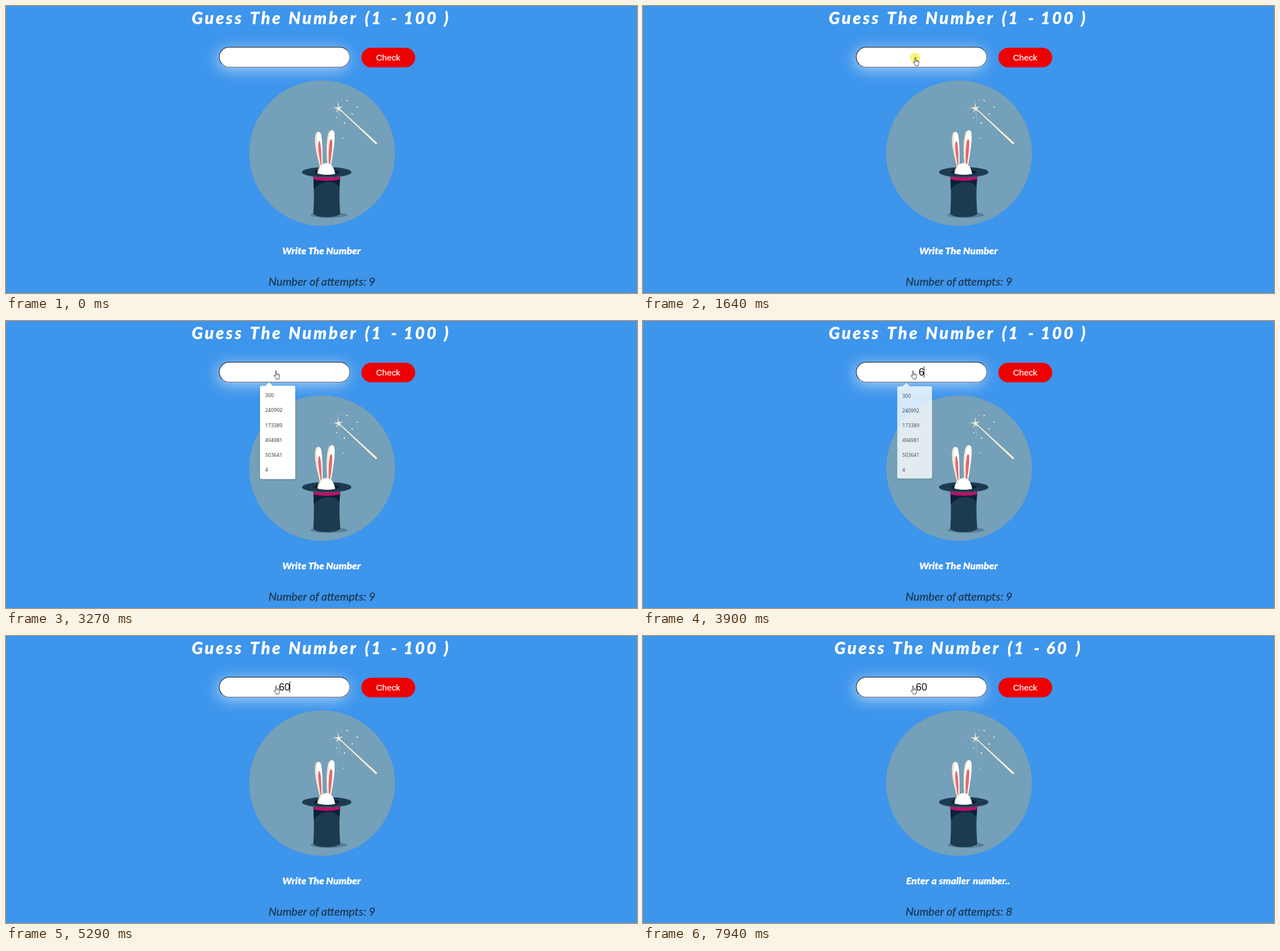
An HTML page that plays this animation: 1108 by 505 pixels, repeating every 8000 ms.

```html
<!DOCTYPE html>
<html lang="en">
<head>
<meta charset="utf-8">
<title>Guess The Number</title>
<style>
  html, body { margin: 0; width: 100%; height: 100%; overflow: hidden; background: #3d95ec; }
  .field {
    position: absolute; left: 374px; top: 72px; width: 230px; height: 36px;
    box-sizing: border-box; border-radius: 18px; background: #fff;
    border: 1px solid; border-color: #10141c #6c6c6c #6c6c6c #10141c;
    box-shadow: -3px 4px 26px rgba(255, 255, 255, .58);
  }
  svg { position: absolute; left: 0; top: 0; width: 1108px; height: 505px; }
  text { white-space: pre; }
  .title { font: italic 900 29.5px Lato, "Open Sans", sans-serif; letter-spacing: 3.2px; fill: #fff; }
  .note { font: italic 900 17.5px Lato, "Open Sans", sans-serif; fill: #fff; stroke: #fff; stroke-width: .2px; }
  .tries { font: italic 400 20px Lato, "Open Sans", sans-serif; fill: #1e3a52; stroke: #1e3a52; stroke-width: .35px; }
  .ui { font: 15px "Liberation Sans", Arial, sans-serif; fill: #fff; text-anchor: middle; }
  .label { stroke: #fff; stroke-width: .2px; }
  .value { font-size: 18px; fill: #111; }
  .list text { font: 8.9px "Open Sans", "Noto Sans", sans-serif; fill: #333; }
  .panel { filter: drop-shadow(0 1px 1px rgba(0, 0, 0, .25)); }

  .anim { animation: 8s step-end infinite; }
  .before { animation-name: before; }
  .after { animation-name: after; }
  .shift { animation-name: shift; }
  .six { animation-name: six; }
  .sixty { animation-name: sixty; }
  .list { animation-name: list; transform-origin: 477px 196px; }
  .click { animation-name: click; }
  .arrow { animation-name: arrow; }
  .hand { animation-name: hand; }
  .caret { animation-name: caret; }

  @keyframes before { 0% { opacity: 1 } 72.5%, 100% { opacity: 0 } }
  @keyframes after { 0% { opacity: 0 } 72.5%, 100% { opacity: 1 } }
  @keyframes shift { 0% { transform: none } 72.5%, 100% { transform: translate(10px, 0) } }
  @keyframes six { 0% { opacity: 0 } 48.75% { opacity: 1 } 53.5%, 100% { opacity: 0 } }
  @keyframes sixty { 0% { opacity: 0 } 53.5%, 100% { opacity: 1 } }
  @keyframes click { 0% { opacity: 0 } 20.5% { opacity: 1 } 22.125%, 100% { opacity: 0 } }
  @keyframes list {
    0% { opacity: 0; transform: none }
    22.125% { opacity: 1; transform: none }
    48.75% { opacity: .79; transform: scale(.988) }
    50.25%, 100% { opacity: 0; transform: none }
  }
  @keyframes arrow {
    0% { opacity: 0; transform: translate(1041px, 495px) }
    4.75% { opacity: 1; transform: translate(1041px, 495px) }
    6.25% { opacity: 1; transform: translate(994px, 478px) }
    7.75% { opacity: 1; transform: translate(850px, 385px) }
    9.375% { opacity: 1; transform: translate(690px, 268px) }
    10.875% { opacity: 1; transform: translate(566px, 184px) }
    12.375% { opacity: 1; transform: translate(512px, 150px) }
    14.125% { opacity: 1; transform: translate(504px, 139px) }
    15.625% { opacity: 1; transform: translate(491px, 118px) }
    17.125%, 100% { opacity: 0; transform: translate(491px, 118px) }
  }
  @keyframes hand {
    0% { opacity: 0; transform: translate(478px, 97px) }
    17.125% { opacity: 1; transform: translate(478px, 97px) }
    18.625% { opacity: 1; transform: translate(474px, 90px) }
    26.625% { opacity: 1; transform: translate(472px, 88px) }
    28.125%, 100% { opacity: 1; transform: translate(470px, 87px) }
  }
  @keyframes caret {
    0% { opacity: 0; transform: translate(489px, 80px) }
    22.125% { opacity: 1; transform: translate(489px, 80px) }
    28.125% { opacity: 0; transform: translate(489px, 80px) }
    34.5% { opacity: 1; transform: translate(489px, 80px) }
    40.875% { opacity: 0; transform: translate(489px, 80px) }
    48.75% { opacity: 1; transform: translate(493px, 80px) }
    53.5% { opacity: 1; transform: translate(498px, 80px) }
    59.75% { opacity: 0; transform: translate(498px, 80px) }
    66.125% { opacity: 1; transform: translate(498px, 80px) }
    72.5% { opacity: 0; transform: translate(498px, 80px) }
    78.625% { opacity: 1; transform: translate(498px, 80px) }
    84.875% { opacity: 0; transform: translate(498px, 80px) }
    92.625% { opacity: 1; transform: translate(498px, 80px) }
    99.25%, 100% { opacity: 0; transform: translate(498px, 80px) }
  }
</style>
</head>
<body>
<div class="field"></div>
<svg viewBox="0 0 1108 505">
  <g class="title">
    <text class="anim shift" y="32"><tspan x="326">Guess</tspan> <tspan x="428">The</tspan> <tspan x="496">Number</tspan> <tspan x="630">(1</tspan> <tspan x="676">-</tspan></text>
    <text class="anim before" y="32"><tspan x="698">100</tspan> <tspan x="769">)</tspan></text>
    <text class="anim after" y="32"><tspan x="708">60</tspan> <tspan x="760">)</tspan></text>
  </g>

  <rect x="624" y="73.4" width="94.6" height="34.6" rx="17.3" fill="#ee0000"/>
  <text class="ui label" x="671" y="95.6">Check</text>

  <!-- magic hat -->
  <circle cx="555" cy="259" r="128" fill="#75a0b9"/>
  <g fill="#f5efdc">
    <path d="M583.6 180.6 L584.6 179.4 L651.8 240.8 Q651.6 243 649.4 243.2 Z"/>
    <path d="M583.2 169.5 L584.6 178 L591.5 177 L586 180.6 L589.5 187 L584.2 182.4 L579 188 L582 181.2 L575 177.8 L582.6 178.6 Z"/>
    <g opacity=".35">
      <path d="M580.5 154 L584.4 180 L583.2 180 Z"/>
      <path d="M562 181.4 L584 179.2 L584 180.8 Z"/>
      <path d="M586.4 213 L583.4 180 L584.8 180 Z"/>
    </g>
    <g id="sparks"></g>
  </g>
  <ellipse cx="567" cy="367.8" rx="32.5" ry="5" fill="#567f99"/>
  <path d="M539.5 296 Q542 332 539.5 366 Q545 371.5 563 371.5 Q581 371.5 587 366 Q584 332 587 296 Z" fill="#1d3b50"/>
  <path d="M539.6 298 H586.9 L585.8 318 Q577 308 563 310 Q548 312 540.6 323 Z" fill="#0b2039"/>
  <path d="M539.7 298 H586.8 L586.4 305 Q563 310.5 540 305 Z" fill="#c00f66"/>
  <ellipse cx="563.2" cy="293" rx="43.3" ry="8.8" fill="#3b5767"/>
  <ellipse cx="563.2" cy="292" rx="43.3" ry="8.6" fill="#1c3a50"/>
  <ellipse cx="563.5" cy="292.2" rx="22" ry="5.4" fill="#0a1f36"/>
  <path d="M551 282 C546 262 540 240 543.5 226 C545.5 219.5 551.5 220 553.3 226.5 C556 240 555.5 264 555.8 280 Z" fill="#f6e5d0"/>
  <path d="M553 281 C549 262 544.5 242 546.3 228 C547.5 220 552 220.5 553.4 227 C556 240 555.5 264 555.8 280 Z" fill="#fff"/>
  <path d="M552.6 280 C550 264 547 250 548.6 240 Q550 235.5 551.6 240 C554 250 553.8 266 554.2 280 Z" fill="#df6b6c"/>
  <path d="M564.2 280 C562.5 258 562 238 566 224 C568.5 216.5 575.5 216.5 576.8 224.5 C578 240 573.5 262 570.8 280 Z" fill="#f6e5d0"/>
  <path d="M566 280 C565 258 565 238 568.8 224 C570.5 216.5 575.8 216.5 576.8 224.5 C578 240 573.5 262 570.8 280 Z" fill="#fff"/>
  <path d="M566.8 279 C566 264 566.3 248 568.8 237 Q571 231.5 572.8 237 C573.5 250 571 266 569.2 279 Z" fill="#df6b6c"/>
  <path d="M546.5 294.8 C548 284 553 276.8 562 276.6 C571 276.6 576 284 577.8 295.6 Q562 298.6 546.5 294.8 Z" fill="#f6e5d0"/>
  <path d="M549.5 295.6 C551 284 556 277 562 276.6 C571 276.6 576 284 577.8 295.6 Q563 298 549.5 295.6 Z" fill="#fff"/>

  <text class="note anim before" y="436.5"><tspan x="485">Write</tspan> <tspan x="530.5">The</tspan> <tspan x="562">Number</tspan></text>
  <text class="note anim after" y="436.5"><tspan x="462">Enter</tspan> <tspan x="506.5">a</tspan> <tspan x="519.5">smaller</tspan> <tspan x="579">number..</tspan></text>
  <g class="tries">
    <text y="492"><tspan x="461">Number</tspan> <tspan x="533">of</tspan> <tspan x="553.5">attempts:</tspan></text>
    <text class="anim before" x="637" y="492">9</text>
    <text class="anim after" x="637" y="492">8</text>
  </g>

  <g id="list" class="list anim">
    <path class="panel" d="M449 114 H455.5 L462 108 L468.5 114 H505 Q508 114 508 117 V275.3 Q508 278.3 505 278.3 H449 Q446 278.3 446 275.3 V117 Q446 114 449 114 Z" fill="#fff"/>
  </g>

  <text class="ui value anim six" x="489" y="96">6</text>
  <text class="ui value anim sixty" x="489" y="96">60</text>
  <rect class="caret anim" width="1" height="19.5" fill="#111"/>

  <circle class="click anim" cx="478" cy="91" r="9" fill="#fcf573"/>
  <path class="arrow anim" d="M.5 .5 V9.6 L2.7 7.6 L4.2 10.8 L5.6 10.2 L4.2 7.1 H7.3 Z" fill="#fff" stroke="#222" stroke-width=".7"/>
  <g class="hand anim" stroke="#333" stroke-width=".9" stroke-linejoin="round" fill="#fff">
    <path d="M3.2 9.8 V1.8 Q3.2 .6 4.2 .6 Q5.2 .6 5.2 1.8 V6 L8.8 6.6 Q10.5 7 10.4 8.6 L9.9 12.4 L9.2 15.2 H4.2 L3.7 13.5 L.8 9.8 Q.4 8.7 1.2 8.3 Q2.1 8.1 3.2 9.8 Z"/>
    <path d="M5.2 6 V8.6 M7 6.4 V8.8 M8.7 6.7 V9" fill="none" stroke-width=".6"/>
  </g>
</svg>
<script>
  const add = (id, markup) => document.getElementById(id).insertAdjacentHTML("beforeend", markup);

  const sparks = [[590, 165.5, 1], [599, 166.5, 1.8], [616.7, 178, 1.8], [608, 190, 1.8],
                  [580.5, 196.5, 1.6], [594.3, 206, 2], [592.5, 232.5, 1.3]];
  for (const [x, y, r] of sparks) {
    const k = r * .35;
    add("sparks", `<path d="M${x} ${y - r} l${k} ${r - k} l${r - k} ${k} l${k - r} ${k} l${-k} ${r - k} l${-k} ${k - r} l${k - r} ${-k} l${r - k} ${-k} Z"/>`);
  }

  ["300", "240992", "173389", "494981", "503641", "4"].forEach((n, i) =>
    add("list", `<text x="455" y="${134.2 + i * 26.25}">${n}</text>`));
</script>
</body>
</html>
```
